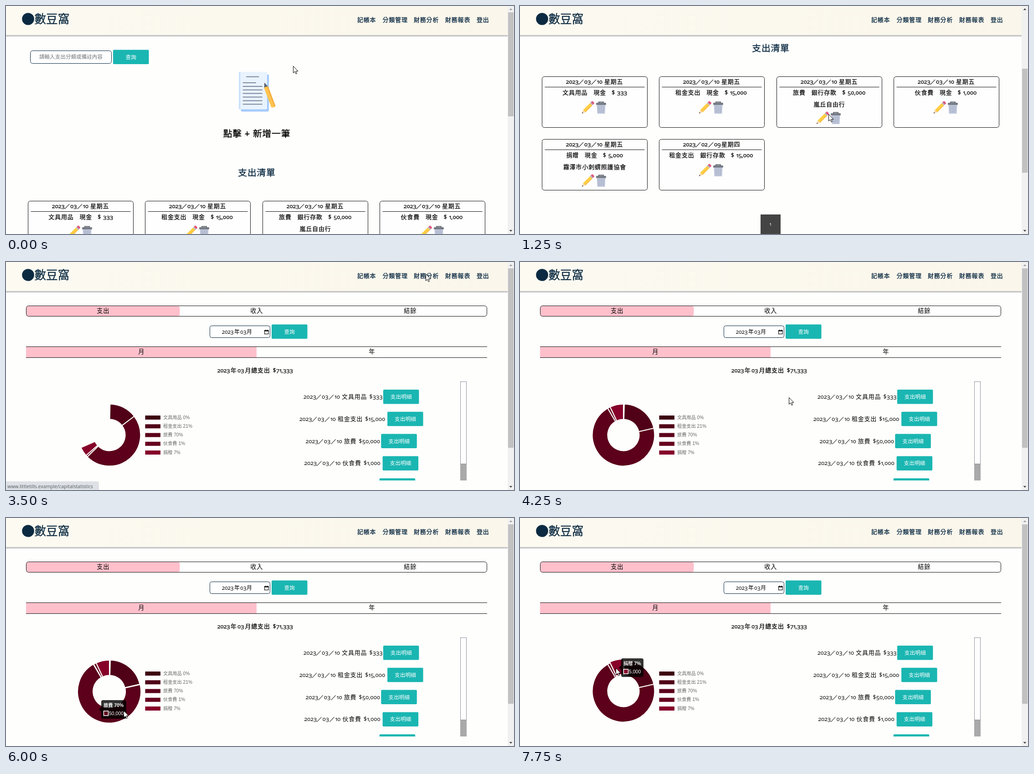
An HTML page for the animation above (8 s loop, 1115 px wide and 502 px high).

```html
<!DOCTYPE html>
<html lang="zh-Hant">
<head>
<meta charset="utf-8">
<title>支出清單</title>
<style>
html, body { margin: 0; width: 100%; height: 100%; overflow: hidden; background: #fefefd; }
svg { display: block; width: 100%; height: 100%; }
text {
  font-family: 'Open Sans', 'Noto Sans CJK TC', 'Noto Sans CJK JP', 'Noto Sans CJK', sans-serif;
  font-variant-numeric: oldstyle-nums proportional-nums;
  letter-spacing: .8px; white-space: pre;
}
.mid { text-anchor: middle; }
.num { letter-spacing: -.1px; }
.tight { letter-spacing: 0; }
.plain { font-family: 'Liberation Sans', 'Noto Sans CJK TC', 'Noto Sans CJK JP', 'Noto Sans CJK', sans-serif; letter-spacing: 0; }
.firm text { stroke: #000; stroke-width: .25px; }
</style>
</head>
<body>
<svg id="stage" viewBox="0 0 1115 502"></svg>
<script>
const NAVY = '#0b2a42', TEAL = '#1ab6b2', PINK = '#ffc0cb', INK = '#111';
const LOOP = 8000, STEP = 250, EM = 13.8;

const text = (x, y, s, size = 13, attrs = '') =>
  `<text x="${x}" y="${y}" font-size="${size}" ${attrs}>${s}</text>`;
const mid = (x, y, s, size, attrs = '') => text(x, y, s, size, `class="mid" ${attrs}`);
const rect = (x, y, w, h, fill, attrs = '') =>
  `<rect x="${x}" y="${y}" width="${w}" height="${h}" fill="${fill}" ${attrs}/>`;
const path = (d, fill, attrs = '') => `<path d="${d}" fill="${fill}" ${attrs}/>`;
const at = (x, y, body, attrs = '') => `<g transform="translate(${x} ${y})" ${attrs}>${body}</g>`;
const num = (x, y, s, size = 13) => text(x, y, s, size, 'class="num"');
const firm = color => `fill="${color}" stroke="${color}" stroke-width=".35"`;

const slash = (x, y) =>
  `<text transform="translate(${x} ${y + 2}) skewX(-30)" font-size="15">/</text>`;
function date(x, y, value) {
  const [year, month, day] = value.split('/');
  return num(x, y, year) + slash(x + 27, y) + num(x + 40, y, month) +
    slash(x + 55, y) + num(x + 68, y, day);
}
const amountWidth = s => 7.2 * s.replace(',', '').length + (s.includes(',') ? 4 : 0);

const button = (x, y, label) => rect(x, y, 78.5, 31.5, TEAL, 'rx="2"') +
  text(x + 39.3, y + 20, label, 11.7, 'class="mid tight" fill="#fff"');

const pencil = '<g transform="rotate(45)">' +
  rect(-3.6, -18, 7.2, 6, '#e2557c', 'rx="2"') + rect(-3.6, -13.5, 7.2, 3, '#b4b9c6') +
  rect(-3.6, -10.5, 7.2, 21, '#ffce45') + rect(2, -10.5, 1.6, 21, '#f8b840') +
  path('M-3.6 10.5H3.6L0 18Z', '#f6d9ae') + path('M-1.4 15H1.4L0 18Z', '#4a3b45') + '</g>';
const trash =
  path('M-5-10V-12.5H5V-10', 'none', 'stroke="#5f646c" stroke-width="2"') +
  path('M-9.5-7H9.5L8.3 13H-8.3Z', '#bcc4d8') +
  path('M-4.5-4V10M0-4V10M4.5-4V10', 'none', 'stroke="#a5aec3" stroke-width="1.2"') +
  rect(-11, -11, 22, 4.8, '#757a84', 'rx="1.5"');

function card(x, y, day, week, kind, pay, amount, note) {
  const cx = 115.5, iconY = note ? 91.5 : 68.5;
  const w = EM * (kind.length + pay.length) + 37 + amountWidth(amount);
  const x1 = cx - w / 2, x2 = x1 + EM * kind.length + 13, x3 = x2 + EM * pay.length + 12;
  return at(x, y,
    rect(0, 0, 231, 112, '#fefefe', `rx="5" stroke="${INK}"`) +
    path('M6 23H225', 'none', `stroke="${INK}"`) +
    date(cx - 63, 15.5, day) + text(cx + 21, 15.5, week) +
    text(x1, 39, kind) + text(x2, 39, pay) + num(x3, 39, '$') + num(x3 + 12, 39, amount) +
    (note ? mid(cx, 65.5, note) : '') +
    at(cx - 15.5, iconY, pencil) + at(cx + 14, iconY, trash), 'class="firm"');
}

function notebook() {
  const ruled = [169, 177, 184.7, 192.6, 200.5, 208.5, 216.3]
    .map((y, i) => `M520.5 ${y}H${i ? 562 : 548}`).join('');
  return rect(515.5, 150.5, 61.5, 82, '#a5cbfc', 'rx="3"') +
    rect(511, 145, 62, 82.5, '#e8f3fe', 'rx="3"') + rect(511, 145, 3.5, 82.5, '#cbe1fb', 'rx="1.7"') +
    path('M528 155.8H554.5' + ruled, 'none', 'stroke="#7f869d" stroke-width="2" stroke-linecap="round"') +
    '<g transform="translate(567 168.5) rotate(-20.5)">' +
    path('M-4.8 12L0 0L4.8 12Z', '#5b6070') + rect(-4.8, 10, 9.6, 48, '#ffc550', 'rx="2.5"') +
    rect(2, 10, 2.8, 48, '#f4ad42', 'rx="1.4"') + '</g>';
}

function ledgerPage() {
  const friday = ['2023/03/10', '星期五'];
  const cards = [
    [...friday, '文具用品', '現金', '333'],
    [...friday, '租金支出', '現金', '15,000'],
    [...friday, '旅費', '銀行存款', '50,000', '嵐丘自由行'],
    [...friday, '伙食費', '現金', '1,000'],
    [...friday, '捐贈', '現金', '5,000', '霧澤市小刺蝟照護協會'],
    ['2023/02/09', '星期四', '租金支出', '銀行存款', '15,000']
  ];
  return rect(53.5, 98.5, 178, 28, '#fff', `rx="5" stroke="${NAVY}"`) +
    text(142.5, 116, '請輸入支出分類或備註內容', 11.6, 'class="mid tight" fill="#757575"') +
    button(235, 96.5, '查詢') + notebook() +
    mid(550.5, 288, '點擊 + 新增一筆', 19.8, firm('#000')) +
    mid(550.5, 374, '支出清單', 19.8, firm(NAVY)) +
    cards.map((c, i) =>
      card(48.5 + Math.round(257.4 * (i % 4)), 429.5 + 138 * (i >> 2), ...c)).join('') +
    rect(528, 733, 44, 44, '#444') + mid(550, 758, '1', 11, 'fill="#fff"');
}

const items = [
  ['文具用品', 333, '0%', '#3d0010'],
  ['租金支出', 15000, '21%', '#500017'],
  ['旅費', 50000, '70%', '#5c001b'],
  ['伙食費', 1000, '1%', '#66001f'],
  ['捐贈', 5000, '7%', '#86002a']
];
const total = items.reduce((sum, it) => sum + it[1], 0);
const money = n => n.toLocaleString('en-US');

function expenseRow([kind, value], i) {
  const s = money(value), y = 281 + 48.8 * i;
  const w = 98 + EM * kind.length + amountWidth(s);
  const x = 780 - (w + 79) / 2, base = y + 20;
  return date(x, base, '2023/03/10') + text(x + 84, base, kind) +
    num(x + 89 + EM * kind.length, base, '$' + s) + button(x + w, y, '支出明細');
}

function analysisPage() {
  const light = 'font-weight="300"';
  const legend = items.map(([kind, , share, color], i) =>
    rect(305.5, 338 + 19.25 * i, 33.5, 9, color) +
    text(345, 345.7 + 19.25 * i, `${kind} ${share}`, 10.2, 'class="plain" fill="#666"')).join('');
  return rect(44.5, 96.5, 1011, 23, '#fefefe', 'rx="5"') +
    rect(44.5, 96.5, 337, 23, PINK, 'rx="5"') +
    rect(44.5, 96.5, 1011, 23, 'none', `rx="5" stroke="${INK}"`) +
    mid(213.3, 112, '支出', 13.2, light) + mid(550.3, 112, '收入', 13.2, light) +
    mid(887.3, 112, '結餘', 13.2, light) +
    rect(447.5, 140.5, 132, 26, '#fff', `rx="4" stroke="${NAVY}"`) +
    num(474, 158, '2023', 12) + text(501, 158, '年', 12) + num(514, 158, '03', 12) + text(528, 158, '月', 12) +
    rect(567.5, 150.5, 8.5, 8, 'none', 'stroke="#111" stroke-width="1.2"') + rect(567, 150, 9.5, 2.6, '#111') +
    path('M569.5 149v2M574 149v2', 'none', 'stroke="#111"') +
    button(583, 137.5, '查詢') +
    rect(44, 187, 506, 23, PINK) +
    path('M44 186.5H1056M44 210.5H1056', 'none', `stroke="${INK}"`) +
    mid(297.3, 202, '月', 13.2, light) + mid(803.3, 202, '年', 13.2, light) +
    '<g class="firm">' + num(464, 243, '2023') + text(493, 243, '年') + num(508, 243, '03') +
    text(524.5, 243, '月總支出') + num(585.5, 243, '$71,333') + '</g>' +
    `<g clip-path="url(#list)">${items.map(expenseRow).join('')}</g>` +
    rect(997, 263, 14, 218, '#a9a9a9') +
    rect(997.5, 263.5, 13, 181, '#fefefe', 'stroke="#8f8f9c"') +
    legend + '<g id="donut"></g><g id="tip"></g>';
}

function header() {
  const nav = [[771, '記帳本'], [826.5, '分類管理'], [895, '財務分析'], [964, '財務報表'], [1033, '登出']];
  return rect(0, 64, 1101, 5, 'url(#shade)') + rect(0, 0, 1101, 64, 'url(#cream)') +
    `<circle cx="48.5" cy="28.5" r="13.3" fill="${NAVY}"/>` +
    text(62.5, 38, '數豆窩', 25.6, `class="tight" ${firm(NAVY)}`) +
    nav.map(([x, s]) => text(x, 34.5, s, 13, firm(NAVY))).join('');
}

const $ = id => document.getElementById(id);
$('stage').innerHTML = `<defs>
  <linearGradient id="cream"><stop stop-color="#fcfaf1"/><stop offset="1" stop-color="#faf6eb"/></linearGradient>
  <linearGradient id="shade" x2="0" y2="1"><stop stop-color="#b9b9bb"/><stop offset=".5" stop-color="#cfcfd0"/>
    <stop offset="1" stop-color="#fefefd" stop-opacity="0"/></linearGradient>
  <clipPath id="list"><rect x="600" y="263" width="397" height="218"/></clipPath></defs>` +
  rect(0, 0, 1115, 502, '#fefefd') +
  `<g id="ledger">${ledgerPage()}</g><g id="analysis">${analysisPage()}</g>` + header() +
  rect(1101, 0, 14, 502, '#f1f1f1') + rect(1102, 14, 12, 229, '#c1c1c1', 'id="thumb"') +
  path('M1104.5 9L1108 5L1111.5 9Z', '#505050', 'id="up"') + path('M1104.5 493L1108 497L1111.5 493Z', '#505050') +
  '<g id="status">' + path('M0 483H200Q204 483 204 487V502H0Z', '#dee1e6') +
  text(3, 497.5, 'www.littletills.example/capitalstatistics', 10.5, 'class="tight" fill="#55595f"') + '</g>' +
  path('M0 0V14.8L3.4 11.7L5.8 17L8 16L5.7 10.9H10.4Z', '#fff', 'id="cursor" stroke="#000" stroke-linejoin="round"');

// Keys are [time, ...values]; values between keys are linear.
const cursorKeys = [
  [0, 630, 132], [250, 677, 238], [1500, 677, 238], [2500, 915, 40], [2750, 932, 20],
  [3000, 921, 26], [3500, 921, 26], [4000, 680, 281], [4250, 590, 298], [5250, 302, 405],
  [5500, 280, 412], [6000, 258, 424], [6500, 228, 430], [6750, 195, 418], [7250, 178, 365],
  [7500, 200, 338], [7750, 210, 330]
];
const scrollKeys = [[500, 0], [750, 176], [1000, 252], [1250, 274]];

function sample(keys, t) {
  const i = keys.findIndex(k => k[0] > t);
  if (i === 0) return keys[0].slice(1);
  if (i < 0) return keys[keys.length - 1].slice(1);
  const a = keys[i - 1], b = keys[i], p = (t - a[0]) / (b[0] - a[0]);
  return a.slice(1).map((v, j) => v + (b[j + 1] - v) * p);
}

function sector(a, b, inner, outer) {
  const pt = (r, n) => `${(r * Math.sin(n)).toFixed(2)} ${(-r * Math.cos(n)).toFixed(2)}`;
  const big = b - a > Math.PI ? 1 : 0;
  return `M${pt(outer, a)}A${outer} ${outer} 0 ${big} 1 ${pt(outer, b)}` +
    `L${pt(inner, b)}A${inner} ${inner} 0 ${big} 0 ${pt(inner, a)}Z`;
}

function donut(progress, hover) {
  let a = 0;
  return at(227, 381, items.map(([, value, , color], i) => {
    const b = a + value / total * 2 * Math.PI * progress, m = (a + b) / 2, on = i === hover;
    const d = on ? sector(a, b, 35.5, 69.5) : sector(a, b, 34.5, 68.3);
    const shift = on ? `transform="translate(${Math.sin(m)} ${-Math.cos(m)})"` : '';
    a = b;
    return path(d, color, `stroke="#fff" stroke-width="2" ${shift}`);
  }).join(''));
}

function tooltip(i) {
  if (i < 0) return '';
  const [x, y, w] = i === 2 ? [209, 401, 55] : [222, 309, 49];
  const [kind, value, share, color] = items[i];
  return at(x, y, '<g opacity=".8">' + rect(0, 0, w, 41, '#000', 'rx="4"') + path('M0 15.5L-5 20.5L0 25.5Z', '#000') + '</g>' +
    text(5, 14.5, `${kind} ${share}`, 10.3, 'class="plain" font-weight="700" fill="#fff"') +
    rect(5.5, 24, 10, 10, color, 'stroke="#fff" stroke-width="1.6"') +
    text(17, 32.5, money(value), 10.5, 'class="plain" fill="#fff"'));
}

const show = (id, on) => $(id).setAttribute('display', on ? 'inline' : 'none');

function draw(time) {
  const t = Math.floor(time % LOOP / STEP) * STEP;
  const analysis = t >= 3500;
  const [scroll] = sample(scrollKeys, t);
  const [x, y] = sample(cursorKeys, t);
  show('ledger', !analysis);
  show('analysis', analysis);
  show('status', t >= 2750 && t < 4250);
  $('ledger').setAttribute('transform', `translate(0 ${-scroll})`);
  $('thumb').setAttribute('y', analysis ? 14 : Math.round(14 + scroll * .4535));
  $('thumb').setAttribute('height', analysis ? 395 : 229);
  $('up').setAttribute('fill', analysis || !scroll ? '#a3a3a3' : '#505050');
  $('cursor').setAttribute('transform', `translate(${x + .5} ${y + .5})`);
  if (analysis) {
    const hover = t >= 7500 ? 4 : t >= 5500 ? 2 : -1;
    const left = Math.max(0, 1 - (t - 3250) / 1000);
    $('donut').innerHTML = donut(1 - left ** 4, hover);
    $('tip').innerHTML = tooltip(hover);
  }
}

const start = performance.now();
function tick() {
  draw(performance.now() - start);
  requestAnimationFrame(tick);
}
tick();
</script>
</body>
</html>
```
